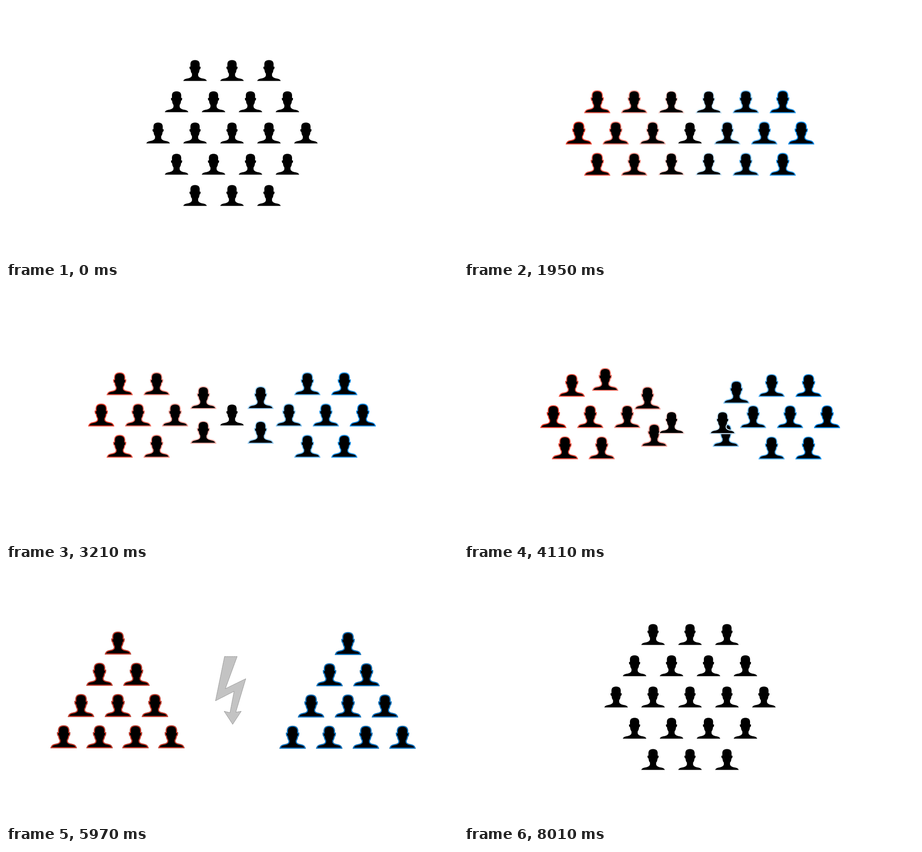
An HTML page with a canvas for the animation above (8100 ms loop, 997 by 561 pixels).

```html
<!DOCTYPE html>
<html lang="en">
<head>
<meta charset="utf-8">
<title>Crowd splitting into two camps</title>
<style>
  html, body { margin: 0; width: 100%; height: 100%; overflow: hidden; background: #fff; }
  canvas { display: block; }
</style>
</head>
<body>
<canvas id="stage" width="997" height="561"></canvas>
<script>
const ctx = document.getElementById('stage').getContext('2d');
const LOOP = 8100, TICK = 30;
const CX = 498.5, CY = 303.5, COL = 81.5, ROW = 69;

// Start and end of each stage of the motion
const MOVES = [[0, 1800], [1800, 3600], [3600, 5370]];
const WIPE = [5370, 5870], DARKEN = [5880, 6780], LIGHTEN = [7080, 8010];

// Pyramid of each side: apex, step of its lowest row, who leads, where the central person joins
const WHITE = [255, 255, 255];
const LEFT = { sign: -1, tint: [236, 64, 46], x: 247, y: 184.3, baseStep: 79.2, lead: 1, gap: 2 };
const RIGHT = { sign: 1, tint: [0, 134, 232], x: 754.4, y: 185.3, baseStep: 80.8, lead: 0, gap: 3 };

const bust = new Path2D('M0-46C5.6-46 9.6-44 10.2-38L10.2-31.4 12.4-31' +
  'C12.4-28 11.6-25.2 10-25.6C9.6-21 8.6-18.4 6.8-16V-12' +
  'C7.6-7.8 13-5.8 18-5.2C22-4.6 25-3 26 0H-26' +
  'C-25-3-22-4.6-18-5.2C-13-5.8-7.6-7.8-6.8-12V-16' +
  'C-8.6-18.4-9.6-21-10-25.6C-11.6-25.2-12.4-28-12.4-31' +
  'L-10.2-31.4-10.2-38C-9.6-44-5.6-46 0-46Z');

const bolt = new Path2D('M482 191H510L484 262 529 240 507 314 519 312 500 341 481 312 494 315 503 268 462 289Z');

function mix(a, b, p) {
  return a.map((v, i) => v + (b[i] - v) * p);
}

function span(t, [from, to]) {
  return Math.min(1, Math.max(0, (t - from) / (to - from)));
}

function ease(t, range) {
  return 0.5 - 0.5 * Math.cos(Math.PI * span(t, range));
}

function shade(color, light) {
  return `rgb(${color.map(v => Math.round(v * light)).join()})`;
}

// Honeycomb cell; h counts half columns from the centre
function cell(h, r) {
  return [CX + h * COL / 2, CY + r * ROW];
}

// Where the owner of a wide cell stands in the hexagon
function hexCell(h, r) {
  if (h === 6) return cell(0, -2);
  if (h === -6 || (h < -2 && r === 1)) return cell(h + 3, r + 1);
  if (Math.abs(h) === 5) return cell(h - 3 * Math.sign(h), 2 * r);
  return cell(h, r);
}

function apartSpot(side, h, r) {
  const [x, y] = cell(h, r);
  if (h === 0) return [x, y];
  return Math.abs(h) === 1 ? [CX + side.sign * 66, CY + r * ROW / 2] : [x + side.sign * 49.5, y];
}

function pyramidSpot(side, row, place) {
  const base = row === 3;
  const step = base ? side.baseStep : COL;
  return [side.x - (base ? 1 : 0) + (place - row / 2) * step, side.y + row * ROW];
}

// k is the place in the row of three, from left to right
function pyramidPlace(side, r, k) {
  if (r === 0) return [2, k];
  if (r === 1) return [3, k < side.gap ? k : k + 1];
  return k === side.lead ? [0, 0] : [1, k > side.lead ? k - 1 : k];
}

function makePerson(side, h, r, place) {
  const far = Math.abs(h) / 6;
  return {
    outer: far > 0.7,
    spots: [hexCell(h, r), cell(h, r), apartSpot(side, h, r), pyramidSpot(side, ...place)],
    tints: [0, far ** 0.85, far && 0.3 + 0.7 * far, 1].map(p => mix(WHITE, side.tint, p))
  };
}

// Back to front: inner cells, outer cells, then the central pair
function makeCrowd() {
  const crowd = [];
  for (const side of [LEFT, RIGHT]) {
    for (const r of [0, -1, 1]) {
      for (let i = 0; i < 3; i++) {
        const h = side.sign * (6 - Math.abs(r) - 2 * i);
        const k = side === LEFT ? i : 2 - i;
        crowd.push(makePerson(side, h, r, pyramidPlace(side, r, k)));
      }
    }
  }
  crowd.sort((a, b) => a.outer - b.outer);
  for (const side of [LEFT, RIGHT]) crowd.push(makePerson(side, 0, 0, [3, side.gap]));
  return crowd;
}

function drawPerson({ spots, tints }, stage, p, light, fringe) {
  const next = Math.min(stage + 1, 3);
  ctx.save();
  ctx.translate(...mix(spots[stage], spots[next], p));
  if (fringe) {
    ctx.lineWidth = 5;
    ctx.strokeStyle = 'rgba(0,0,0,.5)';
    ctx.stroke(bust);
  }
  ctx.lineWidth = 4.3;
  ctx.strokeStyle = shade(mix(tints[stage], tints[next], p), light);
  ctx.stroke(bust);
  ctx.fillStyle = '#000';
  ctx.fill(bust);
  ctx.restore();
}

function drawBolt(shown, light) {
  ctx.save();
  ctx.beginPath();
  ctx.rect(455, 190, 80, 152 * shown);
  ctx.clip();
  ctx.fillStyle = shade([217, 217, 217], light);
  ctx.fill(bolt);
  ctx.lineWidth = 0.8;
  ctx.setLineDash([1.5, 1]);
  ctx.strokeStyle = shade([90, 90, 90], light);
  ctx.stroke(bolt);
  ctx.restore();
}

const crowd = makeCrowd();

function draw(t) {
  const restart = t >= LIGHTEN[0];
  const light = restart ? span(t, LIGHTEN) : 1 - span(t, DARKEN);
  const dark = light < 0.5;
  ctx.fillStyle = dark ? '#000' : '#fff';
  ctx.fillRect(0, 0, 997, 561);

  const stage = restart ? 0 : MOVES.filter(m => t >= m[1]).length;
  const p = restart || stage === 3 ? 0 : ease(t, MOVES[stage]);
  const fringe = !restart && light < 1 && !dark;
  for (const person of crowd) drawPerson(person, stage, p, light, fringe);
  if (!restart && t > WIPE[0]) drawBolt(span(t, WIPE), light);
}

const began = performance.now();
function frame() {
  const t = (performance.now() - began) % LOOP;
  draw(Math.floor(t / TICK) * TICK);
  requestAnimationFrame(frame);
}
frame();
</script>
</body>
</html>
```
